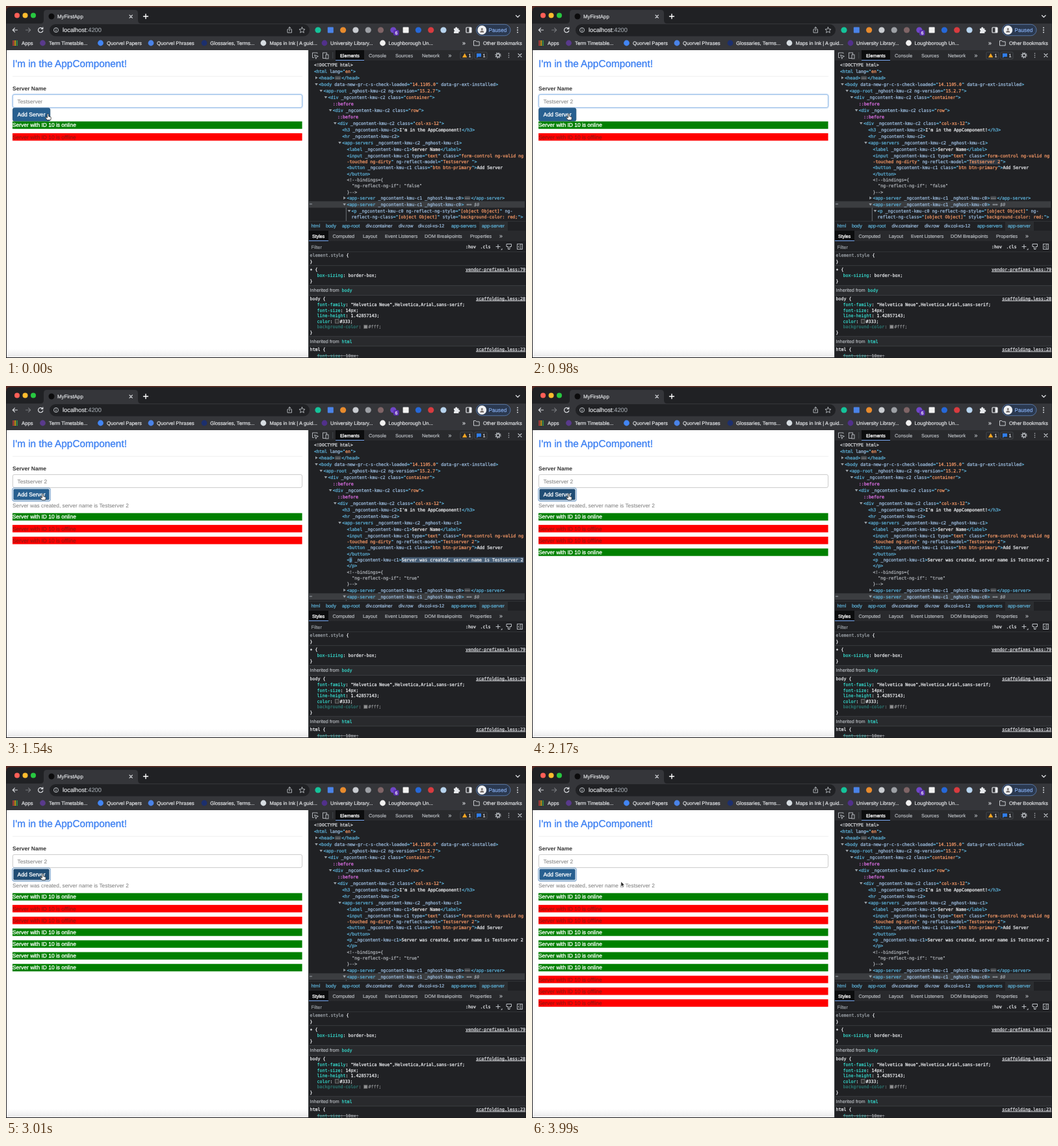
These frames come from a looping animation (800x542 px, 4.06 s). An HTML page:

```html
<!DOCTYPE html>
<html lang="en">
<head>
<meta charset="utf-8">
<title>Server list demo</title>
<style>
  html, body { margin: 0; width: 100%; height: 100%; overflow: hidden; background: #1b1b1d; }
  svg { display: block; width: 100%; height: 100%; }
  text { white-space: pre; text-rendering: geometricPrecision; }
  .sans { font-family: "Liberation Sans", Arial, sans-serif; }
  .mono { font-family: "DejaVu Sans Mono", monospace; }
</style>
</head>
<body>
<svg viewBox="0 0 800 542">
  <defs>
    <linearGradient id="desk"><stop stop-color="#5a2a22"/><stop offset=".5" stop-color="#6b3a2c"/><stop offset="1" stop-color="#33201f"/></linearGradient>
    <linearGradient id="fade" x2="0" y2="1"><stop stop-color="#fff"/><stop offset="1" stop-color="#e9e9ea"/></linearGradient>
    <clipPath id="treeClip"><path d="M465 84H799V331H465Z"/></clipPath>
    <clipPath id="stylesClip"><path d="M465 378H800V541H465Z"/></clipPath>
  </defs>
  <g id="browser"></g>
  <g id="page"></g>
  <g id="tools"></g>
  <g id="tree" clip-path="url(#treeClip)"></g>
  <g id="pointer"></g>
</svg>
<script>
const LOOP = 4060;
const TYPED = 560;                 // "2" is typed into the field
const CLICKS = [1400, 2030, 2240, 2520, 2800, 3080, 3220, 3430];
const ONLINE = [1, 0, 0, 1, 1, 1, 1, 0, 0, 0];
const PRESS = 105;                 // button held down before each click
const FLASH = 600;                 // highlight fade in the element tree
const CHAR = 4, MONO = 6.645;
const TAG = '#5db0d7', ATTR = '#9bbbdc', VALUE = '#f29766', PLAIN = '#e8eaed', DIM = '#9aa0a6', PROP = '#35d4c7', PSEUDO = '#e070e8';

const $ = id => document.getElementById(id);
const escapeText = s => s.replace(/[&<>]/g, c => ({ '&': '&amp;', '<': '&lt;', '>': '&gt;' })[c]);
const rect = (x, y, w, h, fill, more = '') => `<rect x="${x}" y="${y}" width="${w}" height="${h}" fill="${fill}" ${more}/>`;
const dot = (x, y, r, fill, more = '') => `<circle cx="${x}" cy="${y}" r="${r}" fill="${fill}" ${more}/>`;
const line = (d, color = '#dadce0', width = 1.1) =>
  `<path d="${d}" fill="none" stroke="${color}" stroke-width="${width}" stroke-linecap="round" stroke-linejoin="round"/>`;
const shape = (d, fill, more = '') => `<path d="${d}" fill="${fill}" ${more}/>`;

// Text is placed by its left edge and vertical middle; a thin outline sets its weight.
const sans = (x, y, s, size = 7.75, fill = PLAIN, weight = .16, more = '') =>
  `<text class="sans" x="${x}" y="${y + size * .35}" font-size="${size}" fill="${fill}" stroke="${fill}" stroke-width="${weight}" ${more}>${escapeText(s)}</text>`;
const mono = (x, y, s, fill = PLAIN, more = '') =>
  `<text class="mono" x="${x}" y="${y + 2.3}" font-size="${MONO}" fill="${fill}" stroke="${fill}" stroke-width=".26" ${more}>${escapeText(s)}</text>`;

function drawBrowser() {
  const light = (x, c) => dot(x, 14.5, 4, c);
  const out = [
    rect(0, 0, 800, 8, 'url(#desk)'),
    rect(.5, 1.5, 799, 540, '#202124', 'rx="6"'),
    rect(.5, 27, 799, 41, '#35363a'),
    shape('M53 27Q58 27 58 22V11Q58 6 63 6H198Q203 6 203 11V22Q203 27 208 27Z', '#35363a'),
    light(17, '#ff5f57'), light(29.5, '#febc2e'), light(42, '#28c840'),
    dot(70, 16, 4.5, '#0b0b0c'), sans(79, 16, 'MyFirstApp', 7.9),
    line('M190 14l4.4 4.4M194.4 14l-4.4 4.4'),
    line('M211.5 16h7M215 12.5v7', '#fff', 1.4),
    line('M784.5 14.5l2.8 2.8 2.8-2.8', '#dadce0', 1.3),
    line('M17.5 37h-7M13.5 33.8l-3.2 3.2 3.2 3.2'),
    line('M30.5 37h7M34.5 33.8l3.2 3.2-3.2 3.2', '#77797d'),
    line('M56 34.6A3.7 3.7 0 1 0 56.8 38M56.8 32.8v2.6h-2.6', '#dadce0', 1.2),
    rect(67, 28, 400, 18.5, '#202124', 'rx="9.2"'),
    dot(77, 37, 3.5, 'none', 'stroke="#bdc1c6"'), line('M77 37v1.8M77 35.1v.1', '#bdc1c6'),
    sans(87, 37, 'localhost', 9.3), sans(123.7, 37, ':4200', 9.3, DIM),
    line('M434.5 36h-1.5v5h6.5v-5h-1.5M436.3 38.5v-6M434.4 34.2l1.9-1.9 1.9 1.9', '#bdc1c6', .9),
    line('M455.5 32.6l1.3 3 3.2.3-2.4 2.1.7 3.2-2.8-1.7-2.8 1.7.7-3.2-2.4-2.1 3.2-.3z', '#bdc1c6', .9)
  ];
  const extensions = ['#15c39a', '#4a83e8', '#e88b2d', '#c9ccd1', '#9da0a5', '#7f6466', '#7046c8', '#f2f2f2', '#2668d8', '#d83b3f', '#b8d4ee'];
  extensions.forEach((c, i) => out.push(i % 6 === 1
    ? rect(480 + i * 19.3 - 4.5, 32.5, 9, 9, c, 'rx="1"') : dot(480 + i * 19.3, 37, 4.6, c)));
  out.push(
    rect(596, 37, 8.5, 8.5, '#5b2fb0', 'rx="2"'), sans(598.5, 41.3, '6', 7, '#fff'),
    shape('M689 34.5h2.4a1.4 1.4 0 1 1 2.6 0h2.4v2.4a1.4 1.4 0 1 1 0 2.6v2.4h-7.4v-2.3a1.4 1.4 0 0 0 0-2.7z', '#e8eaed'),
    rect(708, 33, 8, 8, 'none', 'rx="1" stroke="#e8eaed" stroke-width="1.2"'), rect(712.5, 33, 3.5, 8, '#e8eaed'),
    rect(723.5, 28.3, 52.5, 17.4, '#2b3950', 'rx="8.7" stroke="#5f83b8" stroke-width=".8"'),
    dot(732.3, 37, 6.9, '#eef0f1'), dot(732.3, 35.6, 1.6, '#77706e'), shape('M729.3 40.8q0-3 3-3t3 3z', '#77706e'),
    sans(742.5, 37, 'Paused', 8.2, '#8ab4f8'),
    ...[-3.4, 0, 3.4].map(d => dot(787, 37 + d, 1, '#dadce0'))
  );
  for (let i = 0; i < 9; i++)
    out.push(rect(10.3 + i % 3 * 2.8, 53.3 + Math.floor(i / 3) * 2.8, 2, 2, ['#ea4335', '#fbbc04', '#34a853', '#4285f4'][(i + Math.floor(i / 3)) % 4]));
  out.push(sans(24, 57, 'Apps'));
  [[56.5, 66, '#593a8c', 'Term Timetable...'], [145.5, 155, '#4285f4', 'Quorvel Papers'], [223, 232, '#4a83e8', 'Quorvel Phrases'],
   [305, 314, '#1c2f6d', 'Glossaries, Terms...'], [396, 405.5, '#d7dde2', 'Maps in Ink | A guid...'],
   [490, 499, '#51308a', 'University Library...'], [579.5, 588.5, '#f1f1f1', 'Loughborough Un...']
  ].forEach(([ix, x, c, s]) => out.push(dot(ix, 57, 4.4, c), sans(x, 57, s)));
  out.push(sans(702, 56.5, '»', 9),
    line('M719.5 60.5v-7h3.2l1.2 1.4h4.3v5.6z', '#dadce0', .9), sans(734, 57, 'Other Bookmarks', 7.7),
    rect(1, 68, 464, 473, '#fff'), rect(1, 528, 464, 13, 'url(#fade)'));
  $('browser').innerHTML = out.join('');
}

function drawTools() {
  const out = [
    rect(465, 68, 334.5, 473, '#202124'), rect(465, 68, 1, 473, '#3c4043'),
    rect(466, 68, 333.5, 16, '#292a2d'), rect(507, 68, 44, 16, '#0c0d0e'), rect(507, 83, 44, 1, '#7cacf8'),
    line('M479 73v-1h-7.5v7.5h2M475 75.5l5.5 2-2.5 1-1 2.5z', '#bdc1c6', .9),
    rect(487.5, 72, 6, 8.5, 'none', 'stroke="#bdc1c6" stroke-width=".9"'), rect(492, 75, 4, 6, '#292a2d', 'stroke="#bdc1c6" stroke-width=".9"'),
    rect(502.5, 71, .7, 10, '#50545a'),
    sans(514, 76.3, 'Elements', 7.2, '#fff', .3),
    ...[[558, 'Console'], [599, 'Sources'], [640, 'Network']].map(([x, s]) => sans(x, 76.3, s, 7.4, '#bdc1c6')),
    sans(680.5, 75.5, '»', 9, '#bdc1c6'),
    rect(699, 71, 19, 10.5, 'none', 'rx="1.5" stroke="#50545a" stroke-width=".7"'),
    shape('M702 79.3l3.7-6.5 3.7 6.5z', '#f5a623'), sans(711.5, 76.3, '1', 7.4),
    rect(721, 71, 19, 10.5, 'none', 'rx="1.5" stroke="#50545a" stroke-width=".7"'),
    shape('M724 73h7v5.3h-4.6l-2.4 1.8z', '#2f7de9'), sans(733.5, 76.3, '1', 7.4),
    dot(757, 76, 2.5, 'none', 'stroke="#bdc1c6" stroke-width="1.3"'), dot(757, 76, 4, 'none', 'stroke="#bdc1c6" stroke-width="1.3" stroke-dasharray="1.5 1.64"'),
    ...[-3, 0, 3].map(d => dot(773.5, 76 + d, .8, '#bdc1c6')),
    line('M788 73.5l5 5M793 73.5l-5 5', '#bdc1c6'),
    rect(466, 331, 333.5, .6, '#3c4043'), rect(728, 331.5, 44, 14.5, '#2b2d30')
  ];
  [[469.5, 'html'], [492, 'body'], [517, 'app-root'], [553.5, 'div', '.container'], [604, 'div', '.row'], [634, 'div', '.col-xs-12'], [685, 'app-servers'], [732, 'app-server']]
    .forEach(([x, tag, cls = '']) => out.push(sans(x, 338.8, tag + cls, 7.3, cls ? ATTR : TAG, .22)));
  out.push(rect(466, 346, 333.5, 16, '#292a2d'), rect(466, 346, 30, 16, '#0c0d0e'), rect(466, 361, 30, 1, '#7cacf8'),
    sans(471, 354.3, 'Styles', 7.1, '#fff', .3),
    ...[[502.5, 'Computed'], [549, 'Layout'], [583, 'Event Listeners'], [644, 'DOM Breakpoints'], [714, 'Properties']].map(([x, s]) => sans(x, 354.3, s, 7.3, '#bdc1c6')),
    sans(759, 353.5, '»', 9, '#bdc1c6'),
    sans(469.5, 371, 'Filter', 7.4, DIM), mono(707, 370.5, ':hov'), mono(729.5, 370.5, '.cls'),
    line('M754 370.5h6M757 367.5v6', '#bdc1c6'), shape('M761 375.5h2.5v-2.5z', '#bdc1c6'),
    shape('M770 366.5h7.5v4h-2.5v4h-2.5v-4H770z', 'none', 'stroke="#bdc1c6" stroke-width="1"'),
    rect(786.5, 366.5, 8, 8, 'none', 'stroke="#bdc1c6" stroke-width=".9"'), line('M792 367v7M790 369l-2 1.6 2 1.6', '#bdc1c6', .9));

  const rule = (y, selector, link, color) => out.push(mono(467.5, y, selector, color), mono(467.5 + selector.length * CHAR, y, ' {'),
    link ? mono(799, y, link, '#dadce0', 'text-anchor="end" text-decoration="underline"') : '');
  const prop = (y, name, value, opacity = 1, swatch) => {
    const x = 478.5 + (name.length + 2) * CHAR, shift = swatch ? 7 : 0;
    out.push(`<g opacity="${opacity}">`, mono(478.5, y, name, PROP), mono(x - 2 * CHAR, y, ':'), mono(x + shift, y, value + ';'),
      swatch ? rect(x, y - 2.8, 5.5, 5.5, swatch, 'stroke="#888" stroke-width=".7"') : '', '</g>');
  };
  const inherited = (y, from) => out.push(rect(466, y - 7.5, 333.5, 15, '#292a2d'), rect(466, y - 7.7, 333.5, .6, '#494c50'),
    rect(466, y + 7.2, 333.5, .6, '#494c50'), sans(467.5, y, 'Inherited from', 7.3, '#b4b8bd'), mono(516.5, y, from, PROP));
  out.push('<g clip-path="url(#stylesClip)">', rect(466, 378, 333.5, .6, '#3c4043'), rect(466, 399.5, 333.5, .6, '#494c50'));
  rule(384, 'element.style', '', DIM);
  rule(405.5, '∗', 'vendor-prefixes.less:79');
  prop(415, 'box-sizing', 'border-box');
  inherited(437.8, 'body');
  rule(450.3, 'body', 'scaffolding.less:28');
  prop(460, 'font-family', '"Helvetica Neue",Helvetica,Arial,sans-serif');
  prop(468.5, 'font-size', '14px');
  prop(477, 'line-height', '1.42857143');
  prop(485.5, 'color', '#333', 1, '#333');
  prop(494, 'background-color', '#fff', .5, '#fff');
  [393.8, 424, 502.5].forEach(y => out.push(mono(467.5, y, '}')));
  inherited(516.3, 'html');
  rule(528.5, 'html', 'scaffolding.less:23');
  prop(538.3, 'font-size', '10px', .65);
  out.push(rect(478.5, 538, 64, .7, DIM), '</g>');
  $('tools').innerHTML = out.join('');
}

// Each line: depth, text, and options for arrow, fixed color, wrapping, selection and highlight.
function treeLines(name, created, nameFlash, messageFlash) {
  const message = 'Server was created, server name is Testserver 2';
  const comment = { color: '#a9adb2', wrap: true };
  const server = '<app-server _ngcontent-kmu-c1 _nghost-kmu-c0>';
  const open = { arrow: 'open' }, closed = { arrow: 'closed' }, wrap = { wrap: true };
  return [
    [0, '<!DOCTYPE html>', { color: '#d5d7da' }],
    [0, '<html lang="en">'],
    [1, '<head>…</head>', closed],
    [1, '<body data-new-gr-c-s-check-loaded="14.1105.0" data-gr-ext-installed>', open],
    [2, '<app-root _nghost-kmu-c2 ng-version="15.2.7">', open],
    [3, '<div _ngcontent-kmu-c2 class="container">', open],
    [4, '::before', { color: PSEUDO }],
    [4, '<div _ngcontent-kmu-c2 class="row">', open],
    [5, '::before', { color: PSEUDO }],
    [5, '<div _ngcontent-kmu-c2 class="col-xs-12">', open],
    [6, '<h3 _ngcontent-kmu-c2>I\'m in the AppComponent!</h3>'],
    [6, '<hr _ngcontent-kmu-c2>'],
    [6, '<app-servers _ngcontent-kmu-c2 _nghost-kmu-c1>', open],
    [7, '<label _ngcontent-kmu-c1>Server Name</label>'],
    [7, '<input _ngcontent-kmu-c1 type="text" class="form-control ng-valid ng', wrap],
    [7, `-touched ng-dirty" ng-reflect-model="${name}">`, { wrap: true, flash: nameFlash, marks: [name] }],
    [7, '<button _ngcontent-kmu-c1 class="btn btn-primary">Add Server', wrap],
    [7, '</button>', wrap],
    ...(created ? [[7, `<p _ngcontent-kmu-c1>${message}`, { wrap: true, flash: messageFlash, marks: ['p', message] }], [7, '</p>', wrap]] : []),
    [7, '<!--bindings={', comment],
    [7, `  "ng-reflect-ng-if": "${created}"`, comment],
    [7, '}-->', comment],
    [7, server + '…</app-server>', closed],
    [7, server, { arrow: 'open', selected: true }],
    [8, '<p _ngcontent-kmu-c0 ng-reflect-ng-style="[object Object]" ng-', { arrow: 'open', wrap: true }],
    [8, 'reflect-ng-class="[object Object]" style="background-color: red;">', wrap]
  ];
}

function drawTree(lines) {
  const out = [];
  let y = 90.5, mode = 'text';
  const paint = ch => {
    if (mode === 'value') { if (ch !== '"') return VALUE; mode = 'attr'; return TAG; }
    if (mode === 'text') { if (ch !== '<') return PLAIN; mode = 'tag'; return TAG; }
    if (ch === '>') { mode = 'text'; return TAG; }
    if (mode === 'tag') { if (ch === ' ') mode = 'attr'; return TAG; }
    if (ch === '"') { mode = 'value'; return TAG; }
    return ch === '=' ? TAG : ATTR;
  };
  for (const [depth, s, o = {}] of lines) {
    const left = 474 + depth * 7.2;
    if (o.selected) out.push(rect(466, y - 5, 332, 10, '#3b3d40'), rect(left - 1.6, y + 5, 1, 40, '#6b7075'), mono(467, y - .5, '⋯', DIM),
      mono(left + (s.length + 1) * CHAR, y, '== $0', DIM, 'font-style="italic"'));
    if (o.arrow) out.push(shape(o.arrow === 'open'
      ? `M${left - 6} ${y - 1.6}h4.6l-2.3 3.6z` : `M${left - 5.2} ${y - 2.3}v4.6l3.6-2.3z`, DIM));
    if (o.flash > 0) for (const m of o.marks)
      out.push(rect(left + s.indexOf(m) * CHAR, y - 4, m.length * CHAR, 8.4, '#54708f', `opacity="${o.flash}"`));
    let x = left, run = '', color;
    const flush = () => { if (run) out.push(mono(x, y, run, color)); x += run.length * CHAR; run = ''; };
    for (const ch of s) {
      if (ch === '…') {
        flush();
        out.push(rect(x + .8, y - 2.8, 9.2, 6, '#46494d', 'rx="1.5"'), ...[3, 5.4, 7.8].map(d => dot(x + d, y + .6, .6, '#c8cacd')));
        x += 11;
        continue;
      }
      const next = o.color || paint(ch);
      if (next !== color) { flush(); color = next; }
      run += ch;
    }
    flush();
    y += o.wrap ? 9.3 : 10;
  }
  return out.join('');
}

function drawPage(name, focused, pressed, added) {
  const top = added ? 195.7 : 177.7;
  const out = [
    sans(10, 88.5, "I'm in the AppComponent!", 15.33, '#3f82f2', .35),
    rect(10, 107.8, 446, .7, '#e8e8e8'),
    sans(10, 127.2, 'Server Name', 8.5, '#333', 0, 'font-weight="700"'),
    focused ? rect(9.6, 135.6, 446.8, 21.6, 'none', 'rx="3.5" stroke="#7fb0e6" stroke-opacity=".25" stroke-width="2"') : '',
    rect(10.4, 136.4, 445.2, 20, '#fff', `rx="2.5" stroke="${focused ? '#85b2e4' : '#c4c4c4'}" stroke-width=".9"`),
    sans(17.5, 146.6, name, 8.4, '#777', 0),
    rect(10.4, 157.2, 57.4, 20, pressed ? '#204d74' : '#286090', 'rx="2.5" stroke="#204d74" stroke-width=".8"'),
    focused ? '' : rect(10.6, 157.8, 56.8, 18.6, 'none', 'rx="2.5" stroke="#fff" stroke-width="1.6"')
      + rect(9.8, 157, 58.4, 20.2, 'none', 'rx="3" stroke="#85abd2" stroke-width="1.2"'),
    sans(17.5, 167.1, 'Add Server', 8.6, '#fff', .3),
    added ? sans(10, 183.7, 'Server was created, server name is Testserver 2', 8.35, '#777', 0) : ''
  ];
  ONLINE.slice(0, 2 + added).forEach((on, i) => {
    const y = top + i * 18.17;
    out.push(rect(10, y, 445.6, 11.5, on ? '#008000' : '#f00'),
      sans(10, y + 5.8, `Server with ID 10 is ${on ? 'online' : 'offline'}`, 8.43, on ? '#fff' : '#8c1a14', on ? .3 : .1));
  });
  return out.join('');
}

const ease = (t, from, to) => {
  const p = Math.min(1, Math.max(0, (t - from) / (to - from)));
  return p * p * (3 - 2 * p);
};

function drawPointer(t) {
  const leave = ease(t, 3600, 3960);
  const x = 64.5 - 8 * ease(t, 70, 490) + 80.5 * leave, y = 166 + 12 * leave;
  const body = x < 68 && y < 177
    ? shape('M-1 1.2Q-1 0 0 0T1 1.2V4L3.6 4.6Q5 5 4.8 6.5L4.2 9.6H-1.2L-3.6 6.2Q-3.8 4.8-2.6 5.2L-1 6.2Z', '#fff', 'stroke="#222" stroke-width=".8"')
    : shape('M0 0V7.4L1.8 5.9 3 8.4 4.2 7.9 3.1 5.4H5.3Z', '#222', 'stroke="#fff" stroke-width=".5"');
  return `<g transform="translate(${x} ${y})">${body}</g>`;
}

const shown = {};
function update(id, markup) {
  if (shown[id] !== markup) $(id).innerHTML = shown[id] = markup;
}

function frame(elapsed) {
  const t = Math.floor(elapsed % LOOP / 70) * 70;
  const name = t < TYPED ? 'Testserver ' : 'Testserver 2';
  const added = CLICKS.filter(c => c <= t).length;
  const pressed = CLICKS.some(c => c > t && c - t <= PRESS);
  const flash = since => t < since ? 0 : Math.max(0, 1 - (t - since) / FLASH);
  update('page', drawPage(name, t < CLICKS[0] - PRESS, pressed, added));
  update('tree', drawTree(treeLines(name, added > 0, flash(TYPED), flash(CLICKS[0]))));
  update('pointer', drawPointer(t));
}

drawBrowser();
drawTools();
const start = performance.now();
requestAnimationFrame(function tick(now) {
  frame(Math.max(0, now - start));
  requestAnimationFrame(tick);
});
</script>
</body>
</html>
```
